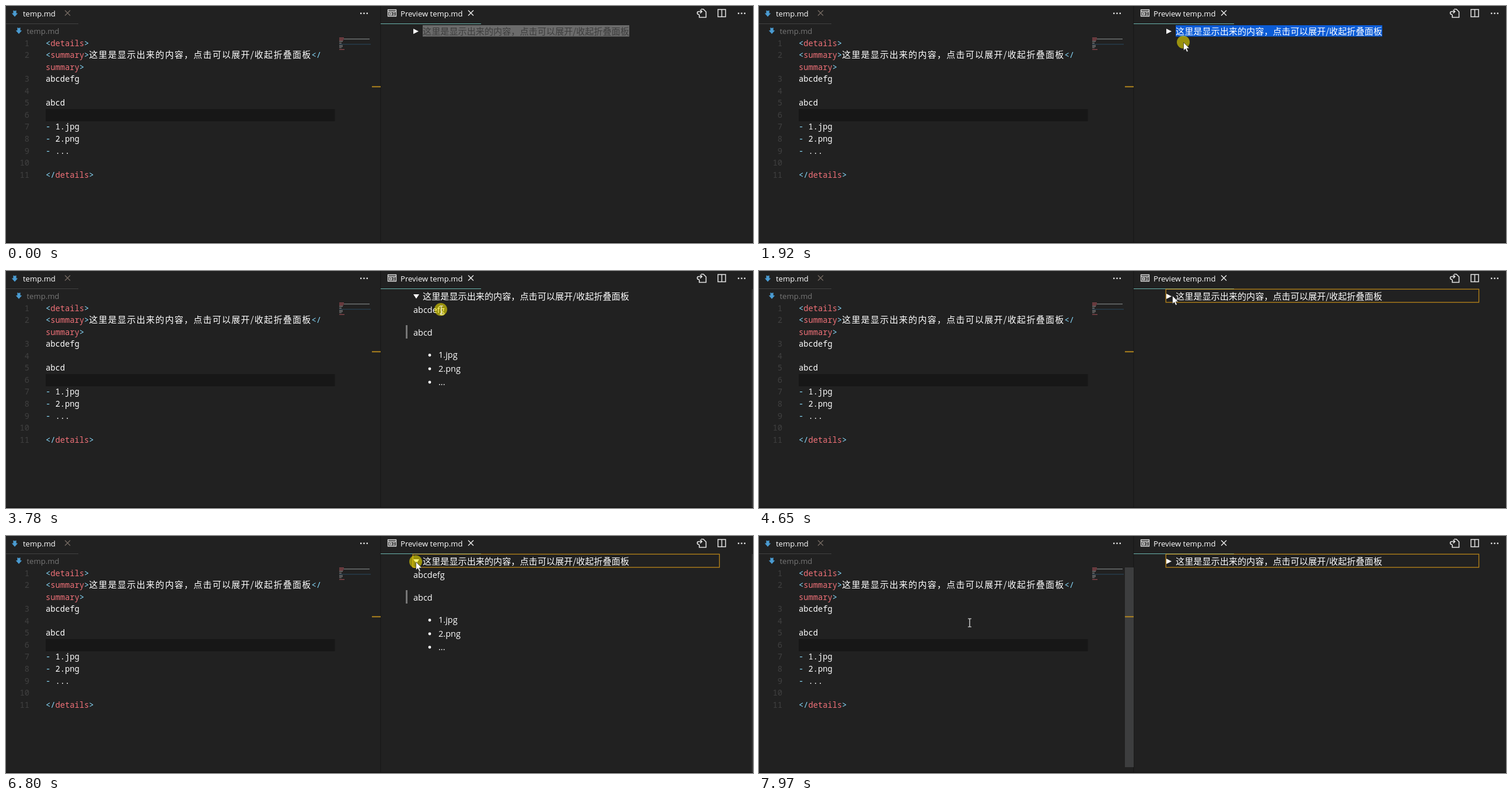
These frames come from a looping animation (1280x407 px, 8 s). An HTML page:

```html
<!DOCTYPE html>
<html lang="zh-CN">
<head>
<meta charset="utf-8">
<title>Markdown preview</title>
<style>
  html, body { margin: 0; height: 100%; overflow: hidden; background: #212121; }
  svg { display: block; width: 1280px; height: 407px; }
  text { white-space: pre; }
  .ui { font: 500 13.1px "Open Sans", "Noto Sans", sans-serif; fill: #fff; }
  .code { font: 500 13.75px "Noto Sans Mono", "DejaVu Sans Mono", monospace; fill: #fff; }
  .num { fill: #404040; font-weight: 400; text-anchor: end; }
  .p { fill: #89ddff; }
  .t { fill: #f07178; }
  .han { font: 300 15px "Noto Sans CJK SC", "Noto Sans CJK", sans-serif; letter-spacing: 1.26px; }
  .sum { font: 15.13px "Noto Sans CJK SC", "Noto Sans CJK", sans-serif; }
  .view { font: 500 14.5px "Open Sans", "Noto Sans", sans-serif; fill: #fff; }
  .line { fill: none; stroke: #e4e4e4; stroke-width: 1.3; }
</style>
</head>
<body>
<svg viewBox="0 0 1280 407">
  <defs>
    <path id="file" fill="#4a9bd1" d="M-2.6-5.5 0-4.6 2.6-5.5V-.6H5.2L0 5.5-5.2-.6H-2.6Z"/>
    <path id="close" fill="none" stroke-width="1.3" d="M-4.5-4.5 4.5 4.5M4.5-4.5-4.5 4.5"/>
    <path id="dots" fill="#f2f2f2" d="M-6.5-1h2.4v2.2h-2.4zM-1.2-1h2.4v2.2h-2.4zM4.1-1h2.4v2.2h-2.4z"/>
  </defs>

  <rect width="1280" height="407" fill="#212121"/>
  <rect x="641" width="1.5" height="407" fill="#191919"/>
  <rect y="405.5" width="1280" height="1.5" fill="#141414"/>

  <!-- tabs -->
  <rect y="30" width="124" height="1" fill="#424242"/>
  <rect x="642" y="30" width="172" height="1" fill="#6bb5ae"/>
  <use href="#file" x="15" y="13"/>
  <text class="ui" x="29" y="17.5">temp.md</text>
  <use href="#close" x="105.5" y="12" stroke="#766b63"/>
  <use href="#dots" x="613.5" y="12.5"/>
  <g class="line">
    <path d="M654.5 6.5h14v11h-14zM654.5 9.5h14M657 12h4v3h-4zM663 12h3.5M663 15h3.5"/>
    <path d="M1188 15v4.5h11.5V10L1195 5.5h-4M1191.500 9.500H1187a2.500 2.500 0 0 0 0 5h1M1189.500 6.500l3 3-3 3" stroke-width="1.6"/>
    <path d="M1220 6h13v12.500h-13zM1226.500 6v12.500" stroke-width="1.5"/>
  </g>
  <text class="ui" x="676" y="17.5">Preview temp.md</text>
  <use href="#close" x="796.5" y="12" stroke="#f2f2f2"/>
  <use href="#dots" x="1260.5" y="12.5"/>

  <!-- editor -->
  <use href="#file" x="22" y="42.5"/>
  <text class="ui" x="35.5" y="47.5" style="fill:#767676">temp.md</text>
  <rect x="68" y="177" width="495.5" height="21" fill="#171717"/>
  <g id="editor" class="code"></g>
  <g id="map"></g>
  <rect id="slider" x="627" y="54" width="15" height="343" fill="#3d3e3f"/>
  <rect x="627" y="137.7" width="15" height="1.8" fill="#bd8d1c"/>

  <!-- preview -->
  <rect id="mark" x="714" y="33" width="354" height="19.5"/>
  <text id="sum" class="sum" x="714" y="49"></text>
  <path id="arrow" fill="#fff"/>
  <g id="body" class="view">
    <rect x="1278" y="31" width="2" height="375" fill="#353535"/>
    <rect id="bar" x="685" y="93" width="3" height="23"/>
    <text x="698" y="72">abcdefg</text>
    <text x="698" y="110.5">abcd</text>
    <circle cx="726" cy="144.5" r="2.4"/><text x="741" y="149.300">1.jpg</text>
    <circle cx="726" cy="168" r="2.4"/><text x="741" y="172.800">2.png</text>
    <circle cx="726" cy="191" r="2.4"/><text x="741" y="195.800">...</text>
  </g>
  <rect id="ring" x="697.2" y="31.2" height="22.6" fill="none" stroke="#b98519" stroke-width="1.3"/>

  <!-- pointer -->
  <g id="mouse">
    <circle id="press" r="11" fill="#fff000" fill-opacity=".55"/>
    <path id="point" d="M.5.5V14.5L3.7 11.6 6 16.8 8.3 15.8 6 10.8H10.5Z" fill="#fff" stroke="#222" stroke-width=".7"/>
    <path id="beam" d="M-2-6H4M-2 8H4M1-6V8" fill="none" stroke="#eee" stroke-width="1.2"/>
  </g>
</svg>
<script>
const $ = id => document.getElementById(id);
const LOOP = 8000;
const label = '这里是显示出来的内容，点击可以展开/收起折叠面板';

// Editor rows: line number and [class, text] runs
const rows = [
  [1, ['p', '<'], ['t', 'details'], ['p', '>']],
  [2, ['p', '<'], ['t', 'summary'], ['p', '>'], ['han', label], ['p', '</']],
  ['', ['t', 'summary'], ['p', '>']],
  [3, ['', 'abcdefg']],
  [4],
  [5, ['', 'abcd']],
  [6],
  [7, ['p', '-'], ['', ' 1.jpg']],
  [8, ['p', '-'], ['', ' 2.png']],
  [9, ['p', '-'], ['', ' ...']],
  [10],
  [11, ['p', '</'], ['t', 'details'], ['p', '>']]
];
const esc = s => s.replace(/</g, '&lt;').replace(/>/g, '&gt;');
$('editor').innerHTML = rows.map(([n, ...runs], i) => {
  const y = 68.5 + 20.57 * i;
  const spans = runs.map(([c, s]) => `<tspan class="${c}">${esc(s)}</tspan>`).join('');
  return `<text class="num" x="40" y="${y}">${n}</text><text x="68" y="${y}">${spans}</text>`;
}).join('');
$('sum').textContent = label;

// Minimap: x, y, width, colour
$('map').innerHTML = [
  [571, 54, 8, '#a85258'], [571, 56, 8, '#a85258'], [579, 56, 44, '#8d9292'],
  [571, 58, 7, '#a85258'], [571, 60, 6, '#999'], [571, 63, 4, '#999'],
  [571, 65, 54, '#29475c'], [571, 67, 6, '#888'], [571, 69, 6, '#888'],
  [571, 71, 4, '#777'], [571, 74, 9, '#a85258']
].map(([x, y, w, c]) =>
  `<rect x="${x}" y="${y}" width="${w}" height="1.3" fill="${c}" opacity=".8"/>`).join('');

// Pointer moves: first step, last step, number of steps, x, y
const moves = [
  [70, 290, 4, 948, 265],
  [450, 1050, 9, 731, 50],
  [1230, 1300, 2, 711, 43],
  [1530, 1530, 1, 708, 42],
  [1680, 1770, 2, 727, 62],
  [2080, 2470, 6, 704, 39],
  [2620, 2620, 1, 703, 39],
  [3620, 3700, 2, 745, 66],
  [4080, 4260, 3, 709, 43],
  [4410, 4410, 1, 708, 42],
  [5420, 5720, 5, 772, 108],
  [6040, 6430, 6, 702, 44],
  [7120, 7890, 11, 354, 148],
  [7970, 7970, 1, 360, 148]
];
const presses = [[1920, 2000], [2770, 2850], [3780, 3930], [4560, 4650],
  [5260, 5340], [5800, 5960], [6800, 6980]];
const opened = [[2850, 4650], [5340, 6980]];
const focused = [[2770, 3780], [4560, 5800], [6800, LOOP]];

const during = (spans, t) => spans.some(([a, b]) => t >= a && t < b);
const show = (id, on) => $(id).setAttribute('visibility', on ? 'inherit' : 'hidden');
const set = (id, name, value) => $(id).setAttribute(name, value);

function pointer(t) {
  let x = 1098, y = 321;
  for (const [a, b, n, tx, ty] of moves) {
    if (t < a) break;
    const gap = n > 1 ? (b - a) / (n - 1) : 1;
    const k = Math.min(1, (Math.floor((t - a) / gap + 1e-6) + 1) / n);
    x += (tx - x) * k;
    y += (ty - y) * k;
  }
  return [Math.round(x), Math.round(y)];
}

function overText(x, y, open) {
  const within = (l, r, top, bottom) => x >= l && x < r && y >= top && y < bottom;
  return within(0, 627, 54, 407) || within(714, 1068, 32, 54) ||
    open && (within(698, 752, 56, 78) || within(698, 730, 93, 116));
}

function draw(t) {
  const [x, y] = pointer(t);
  const open = during(opened, t);
  const beam = overText(x, y, open);

  show('mouse', t >= 70);
  set('mouse', 'transform', `translate(${x} ${y})`);
  show('press', during(presses, t));
  show('beam', beam);
  show('point', !beam);

  const active = t >= 1920;
  show('mark', t < 2770);
  set('mark', 'fill', active ? '#0b5cd6' : '#6b6b6b');
  set('sum', 'fill', active ? '#fff' : '#3d3d3d');

  show('body', open);
  set('arrow', 'd', open ? 'M698 40H708L703 47.5Z' : 'M698 39 707 43.5 698 48Z');
  set('bar', 'fill', y >= 93 && y < 116 ? '#aaa' : '#777');
  show('ring', during(focused, t));
  set('ring', 'width', open ? 525.3 : 536.3);
  show('slider', x < 642);
}

const start = performance.now();
function tick() {
  draw((performance.now() - start) % LOOP);
  requestAnimationFrame(tick);
}
tick();
</script>
</body>
</html>
```
